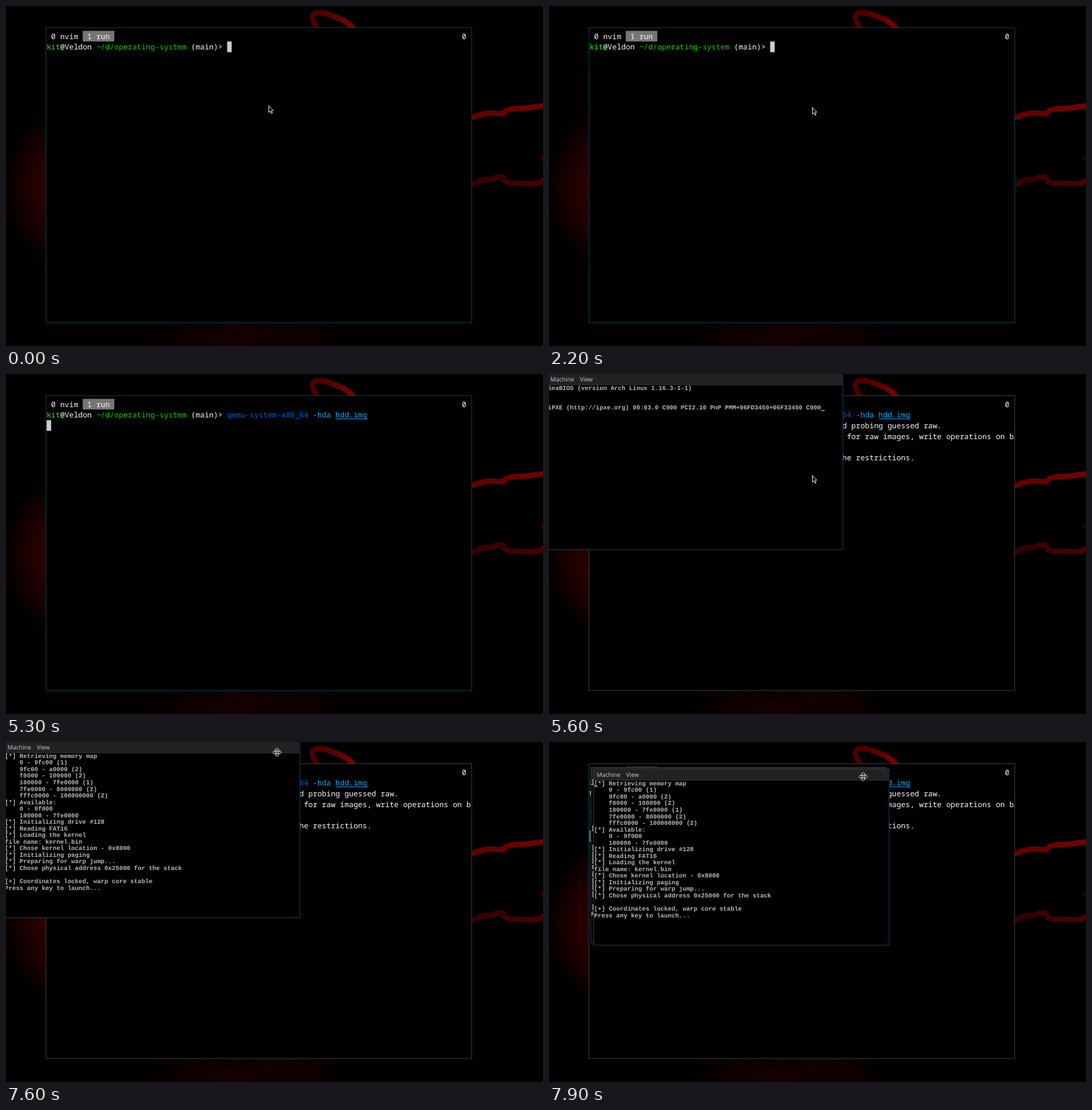
Animation of 941x595 px, one loop 8 s. Source, as an HTML page with a canvas:

```html
<!DOCTYPE html>
<html lang="en">
<head>
<meta charset="utf-8">
<title>Terminal boot</title>
<style>
html, body { margin: 0; width: 100%; height: 100%; overflow: hidden; background: #000; }
canvas { display: block; }
</style>
</head>
<body>
<canvas id="stage" width="941" height="595"></canvas>
<script>
const ctx = document.getElementById('stage').getContext('2d');
const LOOP = 8000, STEP = 100;

const C = {
  text: '#f8f8f8', user: '#23fd00', path: '#19cb00', tab: '#767676', block: '#cccccc',
  command: '#005fd7', operator: '#1aa0b8', param: '#00afff', hint: '#767676', error: '#f2201f',
  active: '#0a4a60', inactive: '#474747', bar: '#222222', menu: '#c4c4c4', vga: '#b8b8b8'
};
const TERM = { x: 71.2, y: 43.5, w: 7.908, h: 18.65, base: 14.1, font: '13.18px "Noto Sans Mono", monospace' };
const VGA = { x: -2, y: 19.2, w: 6.465, h: 11.53, base: 8.7, font: 'bold 10.78px "Liberation Mono", monospace' };
const PROMPT_COLS = 40;

const WARNING = [
  "WARNING: Image format was not specified for 'hdd.img' and probing guessed raw.",
  '         Automatically detecting the format is dangerous for raw images, write operations on b',
  'lock 0 will be restricted.',
  "         Specify the 'raw' format explicitly to remove the restrictions."
];
const BIOS = [
  'SeaBIOS (version Arch Linux 1.16.3-1-1)', '', '',
  'iPXE (http://ipxe.org) 00:03.0 C900 PCI2.10 PnP PMM+06FD3450+06F33450 C900'
];
const BOOT = `[*] Retrieving memory map
    0 - 9fc00 (1)
    9fc00 - a0000 (2)
    f0000 - 100000 (2)
    100000 - 7fe0000 (1)
    7fe0000 - 8000000 (2)
    fffc0000 - 100000000 (2)
[*] Available:
    0 - 9f000
    100000 - 7fe0000
[*] Initializing drive #128
[*] Reading FAT16
[*] Loading the kernel
file name: kernel.bin
[*] Chose kernel location - 0x8000
[*] Initializing paging
[*] Preparing for warp jump...
[*] Chose physical address 0x25000 for the stack

[+] Coordinates locked, warp core stable
Press any key to launch...`.split('\n');
const BUILD = [
  ...['memory', 'paging', 'drive', 'fat16', 'loader', 'print', 'string', 'main'].flatMap(name => [
    `gcc -m32 -ffreestanding -fno-pie -nostdlib -Wall -Wextra -O2 -c src/${name}.c -o build/${name}.o`.slice(0, 94),
    `objcopy -O binary build/${name}.o`
  ]),
  'ld -m elf_i386 -T linker.ld -o build/kernel.bin build/*.o',
  'dd if=build/boot.bin of=hdd.img conv=notrunc'
];

function cells(grid, col, row, text, color) {
  ctx.font = grid.font;
  ctx.fillStyle = color;
  [...text].forEach((ch, i) => {
    if (ch !== ' ') ctx.fillText(ch, grid.x + (col + i) * grid.w, grid.y + row * grid.h + grid.base);
  });
}

// Draws [text, color] pairs side by side and returns the next free column.
function runs(col, row, parts) {
  for (const [text, color] of parts) {
    cells(TERM, col, row, text, color);
    col += text.length;
  }
  return col;
}

function block(col, row, hollow) {
  const x = TERM.x + col * TERM.w, y = TERM.y + row * TERM.h;
  if (hollow) {
    ctx.strokeStyle = C.block;
    ctx.strokeRect(x + .5, y + .5, TERM.w - 1, TERM.h - 1);
  } else {
    ctx.fillStyle = C.block;
    ctx.fillRect(x, y, TERM.w, TERM.h);
  }
}

function frameRect(x, y, w, h, fill, edge) {
  ctx.fillStyle = fill;
  ctx.fillRect(x, y, w, h);
  ctx.strokeStyle = edge;
  ctx.lineWidth = 1;
  ctx.strokeRect(x + .5, y + .5, w - 1, h - 1);
}

function glow(x, y, rx, ry, color) {
  ctx.save();
  ctx.translate(x, y);
  ctx.scale(rx, ry);
  const g = ctx.createRadialGradient(0, 0, 0, 0, 0, 1);
  g.addColorStop(0, `rgba(${color},1)`);
  g.addColorStop(.5, `rgba(${color},.65)`);
  g.addColorStop(1, `rgba(${color},0)`);
  ctx.fillStyle = g;
  ctx.fillRect(-1, -1, 2, 2);
  ctx.restore();
}

// Smooth thick line through the midpoints of a few points.
function ribbon(points, from, to) {
  const first = points[0], last = points[points.length - 1];
  const g = ctx.createLinearGradient(first[0], 0, last[0], 0);
  g.addColorStop(0, from);
  g.addColorStop(1, to);
  ctx.beginPath();
  ctx.moveTo(...first);
  for (let i = 1; i < points.length - 1; i++) {
    const [x, y] = points[i], [nx, ny] = points[i + 1];
    ctx.quadraticCurveTo(x, y, (x + nx) / 2, (y + ny) / 2);
  }
  ctx.lineTo(...last);
  ctx.strokeStyle = g;
  ctx.lineWidth = 9.5;
  ctx.stroke();
}

function wallpaper() {
  ctx.fillStyle = '#000';
  ctx.fillRect(0, 0, 941, 595);
  glow(84, 318, 88, 138, '48,0,0');
  glow(410, 612, 185, 90, '26,0,0');
  glow(500, 595, 90, 85, '16,0,0');
  ribbon([[547, 42], [541, 33], [535, 19], [541, 11], [556, 11], [572, 17], [590, 24], [602, 32], [609, 41]], '#480000', '#780000');
  ribbon([[812, 197], [832, 189], [850, 187], [872, 189], [879, 180], [912, 179], [945, 174]], '#620000', '#700000');
  ribbon([[812, 316], [831, 303], [849, 304], [870, 296], [874, 310], [900, 310], [928, 312], [945, 304]], '#340003', '#480003');
  ctx.fillStyle = '#2a0000';
  ctx.beginPath();
  ctx.ellipse(941, 266, 6, 5, -.6, 0, 7);
  ctx.fill();
}

function suggestion(text) {
  const col = PROMPT_COLS;
  block(col + 1, 1);
  runs(col, 1, [[text[0], C.error], [text[1], '#111'], [text.slice(2), C.hint]]);
}

function makeCommand() {
  return runs(PROMPT_COLS, 1, [['make ', C.command], ['&& ', C.operator], ['clear', C.command]]);
}

function emulatorCommand() {
  const end = runs(PROMPT_COLS, 1, [['qemu-system-x86_64 ', C.command], ['-hda hdd.img', C.param]]);
  ctx.fillStyle = C.param;
  ctx.fillRect(TERM.x + (end - 7) * TERM.w, 78, 7 * TERM.w, 1);
  return end;
}

function terminal(t) {
  frameRect(69.5, 37.5, 747, 517, '#000', t < 5500 ? C.active : C.inactive);
  ctx.fillStyle = C.tab;
  ctx.fillRect(TERM.x + 8 * TERM.w, TERM.y, 7 * TERM.w, TERM.h);
  cells(TERM, 0, 0, ' 0 nvim  1 run', C.text);
  cells(TERM, 92, 0, '0', C.text);
  runs(0, 1, [['kit', C.user], ['@Veldon ', C.text], ['~/d/operating-system ', C.path], ['(main)> ', C.text]]);

  if (t < 1200 || (t >= 2200 && t < 3700)) block(PROMPT_COLS, 1);
  else if (t < 1300) suggestion('make && clear');
  else if (t < 2000) block(makeCommand(), 1);
  else if (t < 2200) {
    makeCommand();
    const shown = t < 2100 ? 6 : BUILD.length;
    BUILD.slice(0, shown).forEach((line, i) => cells(TERM, 0, i + 2, line, C.text));
  }
  else if (t < 4000) suggestion('qemu-system-x86_64 -hda hdd.img');
  else {
    const end = emulatorCommand();
    if (t < 5300) block(end, 1);
    else if (t < 5500) block(0, 2);
    else {
      WARNING.forEach((line, i) => cells(TERM, 0, i + 2, line, C.text));
      block(0, 6, true);
    }
  }
}

function screenLines(t) {
  if (t < 5600) return [];
  if (t < 5700) return BIOS;
  if (t < 5800) return [...BIOS, '', '', 'Booting from Hard Disk...'];
  return t < 5900 ? BOOT.slice(0, 12) : BOOT;
}

function emulator(t, dx, dy) {
  ctx.save();
  ctx.translate(dx, dy);
  frameRect(-3, -1, 518.5, 309, '#000', C.active);
  ctx.fillStyle = C.bar;
  ctx.fillRect(-2, 0, 516.5, 19);
  ctx.fillStyle = '#343434';
  ctx.fillRect(-2, 18.5, 516.5, 1);
  ctx.font = '10.4px "Noto Sans", sans-serif';
  ctx.fillStyle = C.menu;
  ctx.fillText('Machine', 2.5, 13);
  ctx.fillText('View', 54, 13);
  screenLines(t).forEach((line, i) => cells(VGA, 0, i, line, C.vga));

  const blinkOn = t >= 6130 && Math.floor((t - 6130) / 267) % 2 === 0;
  ctx.fillStyle = C.vga;
  if (blinkOn) ctx.fillRect(VGA.x, 28.6, VGA.w, 1.4);
  if (t >= 5600 && t < 5700) ctx.fillRect(VGA.x + 74 * VGA.w, VGA.y + 3 * VGA.h + 9.4, VGA.w, 1.4);
  ctx.restore();
}

function polygon(points) {
  ctx.beginPath();
  points.forEach(p => ctx.lineTo(...p));
  ctx.closePath();
  ctx.fillStyle = '#000';
  ctx.fill();
  ctx.strokeStyle = '#fff';
  ctx.lineWidth = 1;
  ctx.stroke();
}

function arrow(x, y) {
  ctx.save();
  ctx.translate(x + .5, y + .5);
  polygon([[0, 0], [0, 11.6], [2.6, 9.3], [4.6, 13.8], [6.4, 13], [4.5, 8.7], [7.9, 8.4]]);
  ctx.restore();
}

function moveCursor(x, y) {
  const arm = [[-1.4, -4.4], [-3.2, -4.4], [0, -7.5], [3.2, -4.4], [1.4, -4.4], [1.6, -1.6]];
  const points = [];
  for (let k = 0, turn = arm; k < 4; k++) {
    points.push(...turn);
    turn = turn.map(([px, py]) => [-py, px]);
  }
  ctx.save();
  ctx.translate(x, y);
  polygon(points);
  ctx.beginPath();
  ctx.arc(0, 0, 1.8, 0, 7);
  ctx.fill();
  ctx.stroke();
  ctx.restore();
}

function pointer(t, drag) {
  if (t >= 7600) return moveCursor(475 + 75.5 * drag, 18 + 42.5 * drag);
  if (t >= 3400 && t < 5500) return;
  if (t < 300) return arrow(460, 174);
  if (t < 400) return arrow(460.5, 175.5);
  const k = Math.min(1, Math.max(0, (t - 6600) / 900));
  const s = k * k * (3 - 2 * k), r = 1 - s;
  const bend = (a, b, c) => r * r * a + 2 * r * s * b + s * s * c;
  arrow(bend(461, 530, 474), bend(177, 50, 11));
}

function draw(t) {
  wallpaper();
  terminal(t);
  const drag = Math.max(0, (t - 7600) / 300) ** 1.3;
  if (t >= 5500) {
    const dx = Math.round(81 * drag), dy = Math.round(48 * drag);
    if (drag > 0) emulator(t, dx - 5, dy - 3);
    emulator(t, dx, dy);
  }
  pointer(t, drag);
}

ctx.textRendering = 'geometricPrecision';
const start = performance.now();
function tick() {
  const t = Math.max(0, performance.now() - start) % LOOP;
  draw(Math.floor(t / STEP) * STEP);
  requestAnimationFrame(tick);
}
tick();
</script>
</body>
</html>
```
